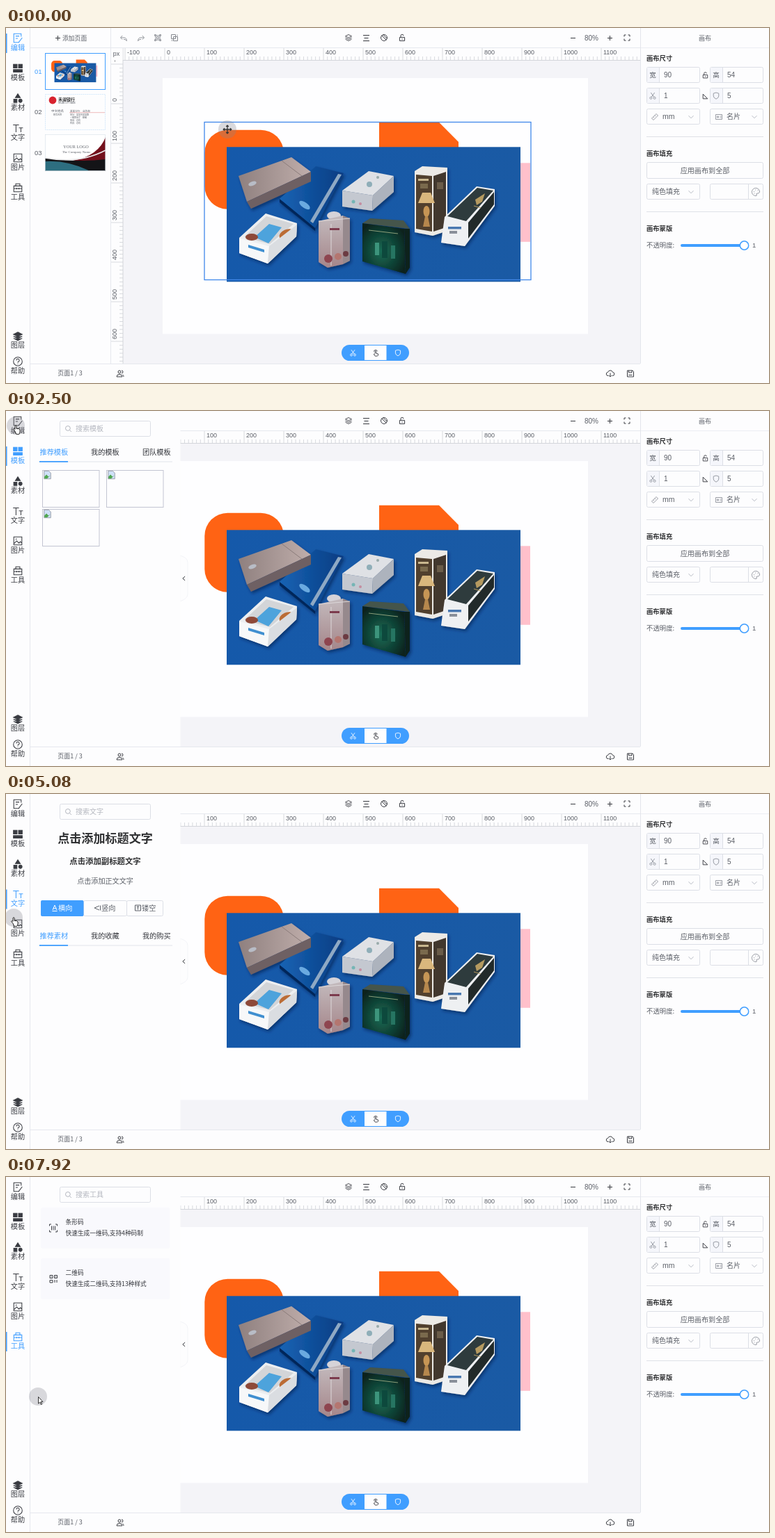
Animation, 1096 px wide and 511 px high, one loop 8 s. Source, as an HTML page:

```html
<!DOCTYPE html>
<html lang="zh-CN">
<head>
<meta charset="utf-8">
<title>画布编辑器</title>
<style>
html,body{margin:0;width:100%;height:100%;overflow:hidden;background:#fdfdfe}
svg{display:block;width:1096px;height:511px}
text{font-family:"Noto Sans CJK SC","Noto Sans CJK",sans-serif;fill:#5a5e66;white-space:pre}
.num{font-family:"Liberation Sans",sans-serif}
.serif{font-family:"Liberation Serif","Noto Serif",serif}
.mid{text-anchor:middle}
.bold{font-weight:700;fill:#303133}
.dark{fill:#33353b}
.hint{fill:#b4b7bf}
.blue{fill:#409eff}
.white{fill:#fff}
.nav text{fill:currentColor}
</style>
</head>
<body>
<svg id="stage" viewBox="0 0 1096 511"></svg>
<script>
const BLUE = '#409eff', INK = '#3a3c42', LINE = '#dcdfe6', PAPER = '#fdfdfe';

// y is the vertical centre of the text
const text = (x, y, s, size = 10, cls = '', attr = '') =>
  `<text x="${x}" y="${y + size * .36}" font-size="${size}" class="${cls}" ${attr}>${s}</text>`;
const rect = (x, y, w, h, fill = 'none', attr = '') =>
  `<rect x="${x}" y="${y}" width="${w}" height="${h}" fill="${fill}" ${attr}/>`;
const path = (d, stroke = LINE, fill = 'none', attr = '') =>
  `<path d="${d}" stroke="${stroke}" fill="${fill}" ${attr}/>`;
const poly = (fill, points, attr = '') => `<polygon points="${points}" fill="${fill}" ${attr}/>`;
const dot = (x, y, r, fill, attr = '') => `<circle cx="${x}" cy="${y}" r="${r}" fill="${fill}" ${attr}/>`;
const oval = (x, y, rx, ry, fill, turn = 0) =>
  `<ellipse cx="${x}" cy="${y}" rx="${rx}" ry="${ry}" fill="${fill}" transform="rotate(${turn} ${x} ${y})"/>`;
const at = (x, y, body, scale = 1) => `<g transform="translate(${x} ${y}) scale(${scale})">${body}</g>`;
const icon = (x, y, d, color = INK, scale = 1, fill = 'none') => at(x, y, path(d, color, fill), scale);
const frame = (x, y, w, h, color = LINE) =>
  rect(x + .5, y + .5, w - 1, h - 1, PAPER, `rx="2" stroke="${color}"`);
const circleD = r => `M${-r} 0a${r} ${r} 0 1 0 ${2 * r} 0a${r} ${r} 0 1 0 ${-2 * r} 0`;
const ngon = n => 'M' + Array.from({length: n}, (_, i) => {
  const a = (i / n - .25 + (n % 4 ? 0 : .5 / n)) * 2 * Math.PI;
  return (7.6 * Math.cos(a)).toFixed(1) + ' ' + (7.6 * Math.sin(a)).toFixed(1);
}).join('L') + 'z';

const ICON = {
  scissors: 'M-3-5L2.2 2.4M3-5L-2.2 2.4M-4.6 3.6a1.7 1.7 0 1 0 3.4 0a1.7 1.7 0 1 0-3.4 0M1.2 3.6a1.7 1.7 0 1 0 3.4 0a1.7 1.7 0 1 0-3.4 0',
  shield: 'M0-5L4.2-3.8V.5Q4 3.6 0 5.2Q-4 3.6-4.2 .5V-3.8z',
  lock: 'M-3.6-.6h7.2v5h-7.2zM-2-.6v-2a2 2 0 0 1 4-.3M0 1.2v1.4',
  layers: 'M0-5L5-2.5 0 0-5-2.5zM-5 0L0 2.5 5 0M-5 2.4L0 5 5 2.4',
  search: 'M-4-.6a3.4 3.4 0 1 0 6.8 0a3.4 3.4 0 1 0-6.8 0M2 2l2.4 2.4',
  chevron: 'M-3.5-1.8L0 1.8 3.5-1.8',
  undo: 'M-2-4.5L-5-1.2-2 1.8M-4.6-1.2H1Q4.8-1 4.8 4Q3.6 1.3 0 1.4',
  group: 'M-3.5-3.5h7v7h-7zM-5-5h2v2h-2zM3-5h2v2h-2zM-5 3h2v2h-2zM3 3h2v2h-2zM-1.5-1.5h3v3h-3z'
};

function photo() {
  const edge = 'stroke="#e8e6e0" stroke-width="1.2"';
  const blueBox = poly('url(#navy)', '445,199 485,209 444,288 393,246') + poly('#06275a', '393,246 444,288 444,292 393,251') +
    poly('#8fa9c4', '477,210 482,211 441,281 437,278') + oval(429, 255, 9, 4, '#6aaae0', 35);
  const beigeBox = poly('url(#beige)', '334,213 410,186 438,207 346,250') + poly('#6e6063', '346,250 438,207 438,221 352,260') +
    path('M396 191L425 213', '#8b7c7b') + oval(354, 224, 6, 3, '#b8bcc6', -20);
  const whiteBox = poly('#dfe1e5', '483,234 521,206 557,213 527,241') + poly('#c4c8d0', '483,234 527,241 526,263 483,257') +
    poly('#adb3bd', '527,241 557,213 557,236 526,263') + dot(522, 225, 4, '#8faeb8') + dot(499, 250, 2.5, '#74b5b5') +
    dot(509, 253, 2, '#c58da0') + dot(534, 215, 2, '#9aa');
  const lampBox = poly('#eceae6', '587,206 598,199 634,201 634,292 613,299 587,294') +
    poly('#51412f', '589,211 612,213 612,293 589,289') + poly('#43372d', '614,213 632,207 632,287 614,293') +
    rect(592, 217, 15, 3, '#c9b78f') + rect(595, 224, 11, 7, '#7a6a4d') +
    poly('#d9b77d', '598,237 610,237 616,252 592,252') + oval(604, 264, 4.5, 8, '#c69554') +
    poly('#b6874d', '602,271 606,271 609,286 599,286') + rect(619, 222, 9, 10, '#6b5c48');
  const longBox = poly('#eef0f2', '630,272 676,228 702,232 702,256 659,314 625,309') +
    poly('#2e3a3c', '634,271 677,230 700,234 661,278') + poly('#20292c', '664,280 701,236 701,254 664,303') +
    rect(635, 286, 19, 3.5, '#4a78b0') + rect(637, 292, 11, 4, '#8a9099') +
    poly('#b59a60', '674,247 688,238 684,250 676,255') + path('M672 256l10 3', '#b59a60');
  const openBox = poly('#eceef0', '335,302 373,267 418,281 417,300 376,339 335,324') +
    poly('#d3d5d8', '342,301 374,271 413,282 379,311') + poly('#4ea3dc', '357,301 378,282 396,287 377,310') +
    oval(403, 297, 11, 7, '#bb6c36', -25) + oval(353, 301, 9, 5, '#8e4a38') +
    poly('#f7f8f9', '335,303 378,314 376,339 335,324') + poly('#3f8fd0', '348,312 371,319 371,323 348,316') +
    poly('#dadde1', '378,314 418,283 417,300 376,339');
  const clearBox = oval(471, 270, 10, 6, '#d6d3d8') + poly('url(#clear)', '449,278 484,270 484,340 462,345 449,337') +
    poly('#96898d', '484,270 494,274 494,335 484,340') + path('M449 278L494 274M467 282V342', '#ddd8da') + rect(465, 288, 14, 3, '#7b3a4e') +
    dot(463, 332, 6, '#8e4450') + dot(477, 329, 5, '#b47670') + dot(488, 325, 4, '#6c3b42');
  const greenBox = poly('#44544c', '512,281 523,274 571,277 580,289') + poly('url(#green)', '512,281 572,289 574,354 512,336') +
    poly('#0b211f', '572,289 580,289 580,345 574,354') + path('M521 291l42 5', '#8c9f7a') +
    rect(530, 309, 6, 18, '#3d947b') + rect(540, 307, 8, 24, '#10483e') + rect(553, 313, 6, 19, '#257562');
  return rect(317, 171.3, 422, 194, 'url(#photoBlue)') +
    `<g filter="url(#soft)">${blueBox}${beigeBox}${whiteBox}${lampBox}${longBox}${openBox}${clearBox}${greenBox}</g>`;
}

const art = '<g id="art">' + rect(285.3, 146.7, 113.6, 114, '#ff6314', 'rx="33"') +
  poly('#ff6314', '536,135.7 622,135.7 650,164 650,190 536,190') + rect(700, 194.3, 53, 113.5, '#ffc0cb') + photo() + '</g>';

function rulers() {
  let ticks = '', labels = '';
  for (let i = -11; i < 120; i++) {
    const x = 228 + 5.7 * i, y = 109 + 5.7 * i, major = i % 10 === 0;
    if (x > 168 && x < 911) ticks += `M${x} ${major ? 29 : 41}V46`;
    if (y > 47 && y < 483) ticks += `M${major ? 150 : 163} ${y}H168`;
    if (!major) continue;
    if (x > 168 && x < 900) labels += text(x + 3, 34.6, i * 10, 9, 'num');
    if (y > 47 && y < 483 || i === -10)
      labels += `<text class="num" font-size="9" transform="translate(158.5 ${y - 3}) rotate(-90)">${i * 10}</text>`;
  }
  return rect(150, 29, 761, 17.5, PAPER) + path('M150 46.5H911', '#d3d5da') + rect(150, 46, 18, 437, PAPER) +
    path('M168 29V483', '#d3d5da') + path(ticks, '#cfd1d6', 'none', 'stroke-width=".8"') +
    `<g clip-path="url(#rulerArea)">${labels}</g>` + rect(150.5, 29, 17, 17, PAPER) + text(158.5, 37, 'px', 9, 'num mid');
}

function toolbar() {
  const grey = '#85888f';
  return rect(150, 0, 761, 28, PAPER) + path('M35 28.5H911', '#e6e8ee') +
    icon(169, 15, ICON.undo, grey, .9) + `<g transform="translate(194 15) scale(-.9 .9)">${path(ICON.undo, grey)}</g>` +
    icon(218, 14, ICON.group, grey, .9) + icon(242, 14, 'M-4.5-4.5h6v6h-6zM-1.5-1.5h6v6h-6zM-4.5 4h2M4-4.5v2', grey) +
    icon(492, 14, ICON.layers, INK, .9) + icon(517.5, 14, 'M-4.5-3.5h9M-3 .5h6M-4.5 4.5h9') +
    icon(543, 14, circleD(4.5) + 'M-3.2-3.2L3.2 3.2M-1-4.2L4.2 1') + icon(569, 14, ICON.lock) +
    icon(814.5, 14.5, 'M-3.5 0h7') + text(841, 14.5, '80%', 10, 'num mid') + icon(867.5, 14.5, 'M-3.5 0h7M0-3.5v7') +
    icon(892, 14, 'M-4-1.5V-4h2.5M1.5-4H4v2.5M4 1.5V4H1.5M-1.5 4H-4V1.5');
}

function pages() {
  const card = rect(56.5, 95.5, 86, 51, PAPER, 'stroke="#d5e9fb" stroke-dasharray="2 1"') +
    dot(67, 104, 5.4, '#d8232f') + text(75, 102.5, '禾澜银行', 6, 'bold') + text(75, 108, 'HELAN CITY BANK', 2.8, 'num') +
    text(65, 119.5, '中文姓名', 4.5, 'serif') + text(68, 125, '职务名称', 3) +
    text(92, 119.5, '某某分行　业务部', 3.6) + path('M91 121.7H142', '#e58d8d', 'none', 'stroke-width=".6"') +
    [['地址：某某市某某路', 125], ['一楼营业厅　邮编', 129], ['电话：总机', 133], ['传真：总机', 137]].map(([s, y]) => text(92, y, s, 3)).join('');
  const brand = rect(56, 153, 87, 52, '#fff') + path('M143 157Q133 184 96 191L143 205z', 'none', '#74101c') +
    path('M56 187Q104 194 143 189V205.5H56z', 'none', '#141417') + path('M56 192Q88 190 120 205.5H56z', 'none', '#2d6e80') +
    path('M56 187Q105 196 143 176', '#e9e9ea', 'none', 'stroke-width="1.6"') + rect(56.5, 153.5, 86, 52, 'none', 'stroke="#d5e0e8" stroke-width=".6"') +
    text(100.5, 171, 'YOUR LOGO', 6.2, 'serif mid') + text(101, 178, 'The Company Name', 4.9, 'serif mid');
  return rect(35, 0, 115, 483, PAPER) + path('M150.5 0V483M35 28.5H150', '#e6e8ee') +
    icon(74.5, 14.5, 'M-3.5 0h7M0-3.5v7') + text(81, 14.5, '添加页面', 8.8) +
    text(41, 62.5, '01', 9.5, 'num blue') + text(41, 121, '02', 9.5, 'num') + text(41, 180, '03', 9.5, 'num') +
    rect(56.5, 36.5, 86, 52, '#fefeff', `stroke="${BLUE}"`) +
    '<use href="#art" transform="translate(56.5 36.5) scale(.1418) translate(-225 -72)"/>' + card + brand;
}

function workspace() {
  return rect(150, 28, 761, 455, '#f4f4f8') + rect(225, 72, 611, 368.5, '#fefeff') + art +
    `<g id="selection">${rect(285, 135.5, 469, 227, 'none', 'stroke="#3f87ea" stroke-width="1.3"')}</g>` +
    rect(482, 456, 97, 23, BLUE, 'rx="11.5"') + rect(515, 457, 31.5, 21, PAPER) +
    icon(498.5, 467.5, ICON.scissors, '#fff', .85) + icon(563, 467.5, ICON.shield, '#fff', .85) +
    icon(531, 467.5, 'M-1 1V-2.5q1-1.3 1.8 0V1l3 .6q.8 3-1 3.6H-1L-3 2.4q.8-1 2-.4M-3-2a3 3 0 0 1 5.8-.4', INK, .9);
}

function inspector() {
  const row = (y, a, va, b, vb) => [[920, a, va], [1011, b, vb]].map(([x, mark, value]) =>
    frame(x, y, 77, 23) + rect(x + 1, y + 1, 17, 21, '#f5f6fb') + path(`M${x + 18.5} ${y}v23`) +
    (ICON[mark] ? icon(x + 9, y + 11.5, ICON[mark], '#8e929b', .9) : text(x + 9, y + 11.5, mark, 9.5, 'mid', 'fill="#8e929b"')) +
    text(x + 25, y + 11.5, value, 10, 'num')).join('');
  const select = (x, y, label, lx) => frame(x, y, 77, 23) + text(lx, y + 11.5, label, 10) + icon(x + 64, y + 12, ICON.chevron, '#b9bdc6');
  return rect(911, 0, 185, 483, PAPER) + path('M911.5 0V483', '#e3e5eb') + path('M912 28.5H1096', '#eceef3') +
    text(1004, 14.5, '画布', 9, 'mid') + text(920, 43.5, '画布尺寸', 9.3, 'bold') +
    row(56, '宽', '90', '高', '54') + icon(1004.5, 68, ICON.lock, INK, .9) +
    row(86, 'scissors', '1', 'shield', '5') + icon(1004.5, 98.5, 'M-3.5-3.5v7h7z', INK, .95) +
    select(920, 116, '', 0) + text(943, 127.5, 'mm', 10.5, 'num') + select(1011, 116, '名片', 1035) +
    icon(932, 128, 'M-4.5 2L2-4.5 4.5-2-2 4.5zM-2 0l1 1M0-2l1 1', '#9a9da5') +
    icon(1024, 128, 'M-4.5-3.5h9v7h-9zM-2.5-1h2v2h-2zM1.5-1h2M1.5 1h2', '#9a9da5') +
    path('M920 156.5H1088M920 264.5H1088', '#dfe1e7') + text(920, 181, '画布填充', 9.3, 'bold') +
    frame(920, 193, 168, 24) + text(1004, 205, '应用画布到全部', 10.1, 'mid') +
    select(920, 224, '纯色填充', 928) + frame(1011, 224, 77, 23) + path('M1066.5 224v23') +
    icon(1077, 236, 'M1 5.5A5.6 5.6 0 1 1 5.6 0Q5 2.5 2 2Q0 2.4 1.4 4zM-3-.5h1M-1-3h1M2.5-2h1M-2.5 2h1', '#9a9da5') +
    text(920, 288.5, '画布蒙版', 9.3, 'bold') + text(920, 313, '不透明度:', 9.4) +
    rect(969, 311, 92, 4, BLUE, 'rx="2"') + dot(1060.5, 313, 6.2, '#fff', `stroke="${BLUE}" stroke-width="1.5"`) + text(1072, 313, '1', 9.5, 'num');
}

function footer() {
  return rect(35, 483, 1061, 28, PAPER) + path('M35 483.5H911', '#e6e8ee') + text(92, 497, '页面1 / 3', 9, 'mid') +
    icon(164, 497.5, 'M-3-2.5a2 2 0 1 0 4 0a2 2 0 1 0-4 0M-5 4.5q0-3.5 4-3.5t4 3.5zM2-4.5a2 2 0 0 1 0 4M3.5 1.5Q5 2.5 5 4.5') +
    icon(868, 497.5, 'M-2.5 3H-3a2.5 2.5 0 0 1-.4-5A3.6 3.6 0 0 1 3.5-2a2.5 2.5 0 0 1-.3 5H2.5M0-1V4.5M-1.8 2.8L0 4.6 1.8 2.8') +
    icon(897, 497.5, 'M-4.5-4.5h7.5l1.5 1.5v7.5h-9zM-2.5-4.5v3h4.5v-3M-2.5 2h5');
}

const NAV = [
  ['编辑', 15, 'M-1 5.5h-4.5v-12h10v4M-3-3.2h5M-3 0h3M6-1L1 5.6M-1 5.5h3'],
  ['模板', 58, 'M-6-5.5h5v5h-5zM1-5.5h5v5h-5zM-6 1.8h12v3.4h-12z', 1],
  ['素材', 101.5, 'M0-6.5L3.4-1.2h-6.8zM-5.6 1h4.4v4.4h-4.4zM1.2 3.1a2.3 2.3 0 1 0 4.6 0a2.3 2.3 0 1 0-4.6 0', 1],
  ['文字', 144.5, 'M-6.5-4.8h8M-2.5-4.8v10M1.5-.8h5.5M4.2-.8v6'],
  ['图片', 187, 'M-5.5-5.5h11v11h-11zM-5.5 4L-1.5 0l3 3 2-2 2 2M-3-2.5h1.5'],
  ['工具', 230, 'M-5.5-2.5h11v8h-11zM-2.8-2.5v-3h5.6v3M-5.5 1h11M-1.5 0v2.2M1.5 0v2.2'],
  ['图层', 443.5, 'M0-5.5L6-2.5 0 .5-6-2.5zM-6 .3L0 3.2 6 .3M-6 3L0 6 6 3', 1],
  ['帮助', 480, circleD(6) + 'M-2-1.5a2 2 0 1 1 2.8 1.8q-.8.4-.8 1.4M0 3v.9']
];
const nav = () => rect(0, 0, 35, 511, PAPER) + path('M34.5 0V511', '#e6e8ee') +
  NAV.map(([label, y, d, solid]) => `<g class="nav">${icon(17, y, d, 'currentColor', 1.05, solid ? 'currentColor' : 'none')}` +
    text(17, y + 13, label, 10.2, 'mid') + '</g>').join('') + `<rect id="bar" width="1.5" height="28" fill="${BLUE}"/>`;

const searchBox = (label, x = 77, w = 131) => frame(x, 14, w, 23) + icon(x + 12.5, 25.5, ICON.search, '#b4b7bf') + text(x + 23, 25.5, label, 10, 'hint');
const tabs = (y, labels) => path(`M47 ${y + 13.5}H239`, '#e1e4ea') + rect(48, y + 12.5, 41, 1.8, BLUE) +
  labels.map((s, i) => text([48.5, 122, 196][i], y, s, 10.2, i ? 'dark' : 'blue')).join('');
const ASSETS = ['推荐素材', '我的收藏', '我的购买'];

function templates() {
  const broken = (x, y) => rect(x + .5, y + .5, 81.5, 53, 'none', 'stroke="#c3c5d2"') +
    at(x + 7.5, y + 7, path('M-5-6h7l3 3v9h-10z', '#9aa0a8', '#cfe0f7') + path('M-4.5 5.5v-3l3-3 3 3 3-2-5 5z', 'none', '#4fa64f'), .95);
  return searchBox('搜索模板') + tabs(59.5, ['推荐模板', '我的模板', '团队模板']) + broken(52, 85) + broken(144, 85) + broken(52, 141);
}

function materials() {
  const head = 'M2.5 6L7 7 6 2.5';
  const rows = [
    [124, 'M-7-7L7 7', '~M-7-7L7 7', 'M-7-7L7 7' + head, '~M-7-7L7 7' + head, 'M-7-7L5 5M4 6a2 2 0 1 0 4 0a2 2 0 1 0-4 0'],
    [191, 'M-7-7Q-6 6 7 7', 'M-7-7Q-6 5 7 7M4 4l4 3-4 2', 'M-7-7Q0-7 0 0T7 7M4 4.5l4 2.5-4 2.5'],
    [258, 'M-7-7H7V7H-7z', 'M-4-7H4Q7-7 7-4V4Q7 7 4 7H-4Q-7 7-7 4V-4Q-7-7-4-7z', 'M-7-7H3Q7-7 7-3V7H-2Q-7 7-7 2z', 'M-7-7H3L7-3V7H-7z', 'M-3-7H3L7-3V7H-7V-3z'],
    [297, 'M-7-7H3L7-3V7H-3L-7 3z', 'M-7-7H3Q7-7 7-3V7H-7z', 'M-3-7H3Q7-7 7-3V7H-7V-3Q-7-7-3-7z'],
    [364, circleD(7), 'M0-7L7 7H-7z', 'M-7-7L7 7H-7z', 'M-3-7H7L3 7H-7z', 'M-7-7H3L7 7H-3z'],
    [403, 'M-7-5H7V5H-7z', 'M0-7.5L7.5 0 0 7.5-7.5 0z', 'M0-7L7-3V7H-7V-3z', 'M-7-7H3L7 0 3 7H-7L-3 0z', 'M-7 7V3Q-5-7 0-7T7 3V7z'],
    [441, 'M-7 0A7 7 0 0 1 7 0z', 'M0-7A7 7 0 1 0 7 0H0z', 'M5-5A7 7 0 1 0 7 2H0z', 'M0-7L5-5A7 7 0 1 1-5-5z', 'M0-7H7V0A7 7 0 1 1 0-7z'],
    [480, ngon(4), ngon(5), ngon(6), ngon(8), ngon(10)]
  ];
  const shapes = rows.map(([y, ...list]) => list.map((d, i) => at(64 + 38.6 * i, y,
    path(d.replace('~', ''), '#73757c', 'none', 'stroke-width="1.2"' + (d[0] === '~' ? ' stroke-dasharray="2 1.2"' : '')))).join('')).join('');
  const bars = [['线条', 83], ['带箭头曲线', 151], ['矩形', 218], ['基础形状', 324]]
    .map(([s, y]) => rect(48, y, 188, 14.5, '#ececf0') + text(53, y + 7, s, 10)).join('');
  return rect(64, 14, 33, 23, BLUE, 'rx="2"') + searchBox('搜索素材', 96, 123) + tabs(59.5, ASSETS) + bars + shapes + rect(246.5, 0, 3.5, 194, '#bfc0c6');
}

function typing() {
  return searchBox('搜索文字') + text(142.5, 64, '点击添加标题文字', 17.1, 'mid bold') +
    text(142.5, 97, '点击添加副标题文字', 11.4, 'mid bold') + text(142.5, 125, '点击添加正文文字', 10.1, 'mid') +
    frame(50, 153, 62, 23) + frame(111, 153, 63, 23) + frame(173, 153, 53, 23) + rect(50, 153, 61.5, 23, BLUE, 'rx="2"') +
    icon(70, 164, 'M-3 3L0-4 3 3M-2 .8h4M-3.5 4.5h7', '#fff') + text(75, 164.5, '横向', 10.2, 'white') +
    icon(131, 164, 'M3-3L-4 0 3 3M4.5-3.5v7', '#5a5e66') + text(137, 164.5, '竖向', 10.2) +
    icon(189.5, 164, 'M-4-4h8v8h-8zM-2-2h4M0-2v4.5', '#5a5e66') + text(195, 164.5, '镂空', 10.2) + tabs(204.5, ASSETS);
}

const pictures = () => searchBox('搜索图片') + tabs(59.5, ASSETS);

function tools() {
  const card = (y, mark, title, note) => rect(50, y, 185.5, 59, '#f9f9fd', 'rx="3"') +
    icon(68, y + 29.5, mark) + text(85.5, y + 21, title, 8.7, 'dark') + text(85.5, y + 37, note, 8.7, 'dark');
  return searchBox('搜索工具') +
    card(44, 'M-5.5-3V-5.5H-3M3-5.5H5.5V-3M5.5 3V5.5H3M-3 5.5H-5.5V3M-2.5-3v6M0-3v6M2.5-3v6', '条形码', '快速生成一维码,支持4种码制') +
    card(117, 'M-5-5h4v4h-4zM1.5-5h4v4h-4zM-5 2h4v3.5h-4zM2 1.5v4M5 1.5v4M-3.5-3h1M3-3h1', '二维码', '快速生成二维码,支持13种样式');
}

const panel = () => '<g clip-path="url(#panelArea)"><g id="panel">' +
  path('M250 208Q261 211 261 218V264Q261 270 250 274z', '#f3f4f8', PAPER) + rect(35, 0, 215.5, 483, PAPER) +
  icon(255.5, 241, 'M1.6-3L-1.6 0 1.6 3') + [templates, materials, typing, pictures, tools].map(f => `<g class="page">${f()}</g>`).join('') + '</g></g>';

const cursor = '<g id="cursor">' + dot(0, 0, 13, '#85858f', 'opacity=".3"') +
  '<g class="shape">' + path('M-5.5 0H5.5M0-5.5V5.5M-4-1.8L-5.8 0-4 1.8M4-1.8L5.8 0 4 1.8M-1.8-4L0-5.8 1.8-4M-1.8 4L0 5.8 1.8 4', '#333', 'none', 'stroke-width="1.3"') + '</g>' +
  '<g class="shape">' + path('M.5.5v9.6l2.3-2 1.5 3.5 1.4-.6-1.5-3.4h2.8z', '#222', '#fff', 'stroke-width=".9"') + '</g>' +
  '<g class="shape">' + path('M-1 8.2L-3.6 5.4q.7-1.4 2.6 0V.4q1.1-1.5 2.1 0V4.4q4.2-.4 5 1.6V9q-.3 2-1.2 3.4H.8z', '#222', '#fff') + '</g></g>';

const grad = (id, a, b, vec = '', kind = 'linear') =>
  `<${kind}Gradient id="${id}" ${vec}><stop stop-color="${a}"/><stop offset="1" stop-color="${b}"/></${kind}Gradient>`;
const defs = '<defs>' + grad('photoBlue', '#1559aa', '#1a5aa4') + grad('beige', '#8f807f', '#c0aeab') + grad('navy', '#1663b4', '#0a3c82') +
  grad('clear', '#c3babd', '#a5868a', 'x1="0" y1="0" x2="0" y2="1"') +
  grad('green', '#1a6c55', '#08241f', 'cx=".45" cy=".55" r=".6"', 'radial') +
  '<filter id="soft"><feDropShadow dx="2" dy="3" stdDeviation="2" flood-color="#04224f" flood-opacity=".6"/></filter>' +
  `<clipPath id="panelArea">${rect(35, 0, 300, 483, '#000')}</clipPath><clipPath id="rulerArea">${rect(150, 29, 761, 454, '#000')}</clipPath></defs>`;

const stage = document.getElementById('stage');
stage.innerHTML = defs + rect(0, 0, 1096, 511, PAPER) + workspace() + rulers() + toolbar() + pages() + panel() + nav() + footer() + inspector() + cursor;

const LOOP = 8000, FPS = 12;
const OPEN = [[0, 0], [2083, 0], [2426, 1], [3250, 1], [3593, 0], [4083, 0], [4426, 1], [LOOP, 1]];
const TABS = [[0, 0], [2000, 1], [3166, 0], [4000, 2], [4666, 3], [5500, 4], [6333, 5]];
const ROUTE = [
  [0, 318, 146], [417, 318, 146], [1250, 33, 72], [1333, 24, 65], [1750, 16, 62], [1917, 16, 62], [2500, 14, 21], [3083, 14, 21],
  [3750, 14, 103], [3917, 14, 103], [4333, 11, 144], [4500, 11, 147], [4583, 11, 147], [5083, 11, 178], [5250, 12, 186], [5417, 12, 186],
  [6167, 16, 226], [6250, 16, 226], [6833, 22, 240], [7000, 30, 248], [7083, 40, 232], [7417, 98, 89], [7750, 46, 316], [LOOP, 46, 316]
];

function sample(keys, t, ease = p => p) {
  const i = keys.findIndex(k => k[0] > t), a = keys[i - 1], b = keys[i];
  const p = ease((t - a[0]) / (b[0] - a[0]));
  return a.slice(1).map((v, j) => v + (b[j + 1] - v) * p);
}
const smooth = p => p * p * (3 - 2 * p);
const $ = s => document.querySelector(s), all = s => [...document.querySelectorAll(s)];
const navItems = all('.nav'), pageItems = all('.page'), shapes = all('.shape');
const show = (el, on) => { el.style.display = on ? '' : 'none'; };

function render(now) {
  const t = Math.floor((now % LOOP + 5) * FPS / 1000) % (LOOP * FPS / 1000) * 1000 / FPS;
  const tab = TABS.filter(k => k[0] <= t + 1).pop()[1];
  const [open] = sample(OPEN, t), [x, y] = sample(ROUTE, t, smooth);
  navItems.forEach((el, i) => { el.style.color = i === tab ? BLUE : INK; });
  $('#bar').setAttribute('y', NAV[tab][1] - 7);
  pageItems.forEach((el, i) => show(el, i === (tab || 1) - 1));
  show($('#panel'), open > 0);
  $('#panel').setAttribute('transform', `translate(${215 * (open - 1)} 0)`);
  show($('#selection'), t < 740);
  const onLink = x < 34 || t > 7100 && y < 175;
  const kind = t < 570 ? 0 : onLink ? 2 : 1;
  shapes.forEach((el, i) => show(el, i === kind));
  $('#cursor').setAttribute('transform', `translate(${x} ${y})`);
}

const start = performance.now();
function tick() {
  render(performance.now() - start);
  requestAnimationFrame(tick);
}
tick();
</script>
</body>
</html>
```
